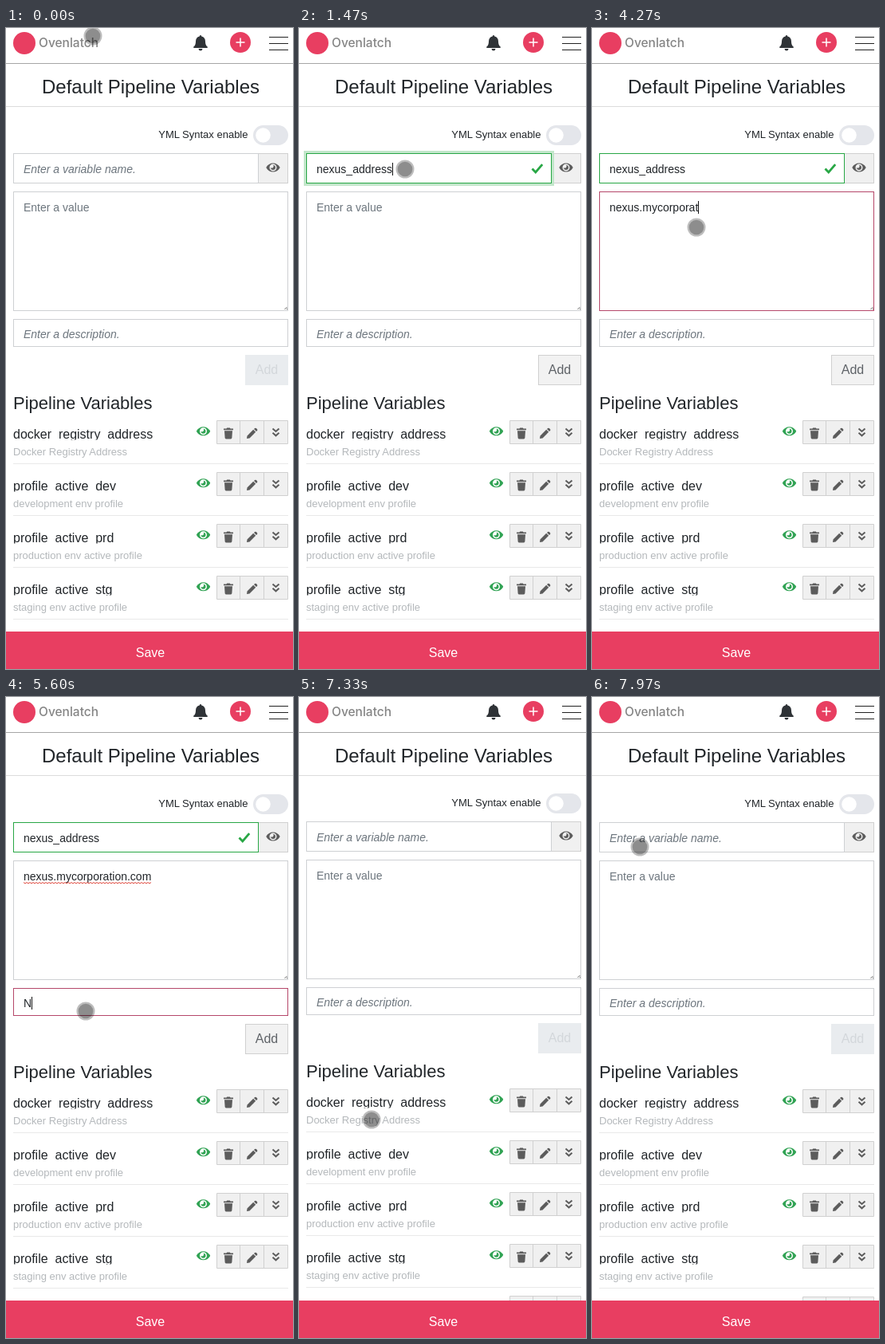
Write an HTML page that moves like this. It is 360 px wide and 804 px high and loops after 8000 ms.

```html
<!DOCTYPE html>
<html lang="en">
<head>
<meta charset="utf-8">
<title>Default Pipeline Variables</title>
<style>
  html, body { margin: 0; width: 100%; height: 100%; overflow: hidden; background: #fff; }
  svg { display: block; width: 360px; height: 804px; font-family: "Liberation Sans", Arial, sans-serif; }
  text { fill: #212529; white-space: pre; }
  .field { font-size: 14px; }
  .hint { font-size: 14px; fill: #6c757d; }
  .italic { font-style: italic; }
  .note { font-size: 13px; fill: #b4b8bb; }
  .box { fill: #fff; stroke: #ced0d3; }
  .btn { fill: #f0f0f0; stroke: #d0d0d0; }
  .icon { fill: #5c5c5c; }
</style>
</head>
<body>
<svg viewBox="0 0 360 804">
  <defs>
    <clipPath id="pageClip"><rect y="99" width="360" height="658"/></clipPath>
    <clipPath id="nameClip"><rect width="230" height="24.5"/></clipPath>
    <g id="eye">
      <path fill-rule="evenodd" d="M-8.7 0C-5-7.4 5-7.4 8.7 0C5 7.4-5 7.4-8.7 0ZM-4.5 0A4.5 4.5 0 1 0 4.5 0A4.5 4.5 0 1 0-4.5 0Z"/>
      <path d="M-3 0A3 3 0 1 0 0-3A1.7 1.7 0 0 1-3 0Z"/>
    </g>
    <g id="trash">
      <path d="M-6-6H-2.5L-1.8-7H1.8L2.5-6H6V-4.3H-6ZM-5-3.3H5L4.4 5.6Q4.3 7 3 7H-3Q-4.3 7-4.4 5.6Z"/>
    </g>
    <g id="pen">
      <path d="M-6.5 6.5L-6 3L1.7-4.7L4.7-1.7L-3 6ZM2.5-5.5L3.6-6.6Q4.5-7.2 5.4-6.4L6.4-5.4Q7.2-4.5 6.6-3.6L5.5-2.5Z"/>
    </g>
    <path id="chevrons" d="M-4-4.5L0-1L4-4.5M-4 .8L0 4.3L4 .8" fill="none" stroke="#5c5c5c" stroke-width="2"/>
  </defs>

  <rect width="360" height="804" fill="#fff"/>

  <g clip-path="url(#pageClip)">
    <g id="page">
      <text x="303.5" y="138" font-size="13" text-anchor="end">YML Syntax enable</text>
      <rect x="310" y="122" width="44" height="25" rx="12.5" fill="#e4e6eb"/>
      <circle cx="322.5" cy="134.5" r="9.3" fill="#fff"/>

      <rect class="btn" x="316.5" y="157.5" width="37" height="37"/>
      <use href="#eye" x="335" y="175" class="icon"/>
      <rect id="glow" x="7.5" y="155.5" width="311" height="41" fill="none" stroke="#c3e6cb" stroke-width="3"/>
      <rect id="nameBox" class="box" x="9.5" y="157.5" width="307" height="37"/>
      <path id="check" d="M292.5 176.5L296.8 181L305.2 171.2" fill="none" stroke="#28a745" stroke-width="2.8"/>
      <text id="nameHint" class="hint italic" x="22" y="182">Enter a variable name.</text>
      <text id="nameText" class="field" x="22" y="182"></text>

      <rect id="valueBox" class="box" x="9.5" y="205.5" width="344" height="149"/>
      <path d="M349.5 353L352.5 350M352 353L353 352" stroke="#666" stroke-width="1"/>
      <text id="valueHint" class="hint" x="22" y="230">Enter a value</text>
      <text id="valueText" class="field" x="22" y="230"></text>
      <path id="squiggle" fill="none" stroke="#e0453a" stroke-width="1"/>

      <rect id="descBox" class="box" x="9.5" y="365.5" width="344" height="34"/>
      <text id="descHint" class="hint italic" x="22" y="389">Enter a description.</text>
      <text id="descText" class="field" x="22" y="389"></text>

      <rect id="caret" width="1" height="16" fill="#111"/>

      <rect id="addBox" x="300.5" y="410.5" width="53" height="37"/>
      <text id="addText" x="327" y="434" font-size="16" text-anchor="middle">Add</text>

      <text x="9" y="478" font-size="22">Pipeline Variables</text>
      <g id="rows"></g>
    </g>
  </g>

  <path d="M0 44.5H360" stroke="#a6a6a6"/>
  <path d="M0 98.5H360" stroke="#dcdcdc"/>
  <circle cx="23" cy="19" r="14" fill="#e83e61"/>
  <text x="41" y="23.5" style="font:500 15.5px Inter,sans-serif;fill:#858585">Ovenlatch</text>
  <path d="M244 9Q245.3 9 245.3 10.6Q250 11.8 250 17Q250 21.5 252.7 23.6V25H235.3V23.6Q238 21.5 238 17Q238 11.8 242.7 10.6Q242.7 9 244 9ZM241.5 26H246.5Q246.2 28.6 244 28.6Q241.8 28.6 241.5 26Z" fill="#2f3337"/>
  <circle cx="294" cy="18" r="13" fill="#e83e61"/>
  <path d="M288.5 18H299.5M294 12.5V23.5" stroke="#fff" stroke-width="1.5"/>
  <path d="M330 11.5H354M330 19.5H354M330 27.5H354" stroke="#222"/>
  <text x="45" y="82" font-size="24">Default Pipeline Variables</text>

  <rect y="757" width="360" height="47" fill="#e83e61"/>
  <text x="181" y="789" font-size="16" text-anchor="middle" style="fill:#fff">Save</text>

  <g id="pointer">
    <circle r="11.5" fill="#000" fill-opacity=".26"/>
    <circle r="9.3" fill="#000" fill-opacity=".25"/>
  </g>
</svg>

<script>
const LOOP = 8000;
const ADDED = 6800;
const el = id => document.getElementById(id);
const show = (id, on) => el(id).setAttribute('visibility', on ? 'visible' : 'hidden');
const set = (id, attrs) => {
  for (const key in attrs) el(id).setAttribute(key, attrs[key]);
};

const fields = [
  { id: 'name', text: 'nexus_address', focus: 440, blur: 2090, start: 530, step: 72, y: 169 },
  { id: 'value', text: 'nexus.mycorporation.com', focus: 2090, blur: 5240, start: 2760, step: 95, y: 217 },
  { id: 'desc', text: 'Nexus Address', focus: 5240, blur: ADDED - 30, start: 5560, step: 75, y: 376 }
];

const pointerPath = [
  [30, 109, 10], [420, 133, 177], [1700, 133, 177], [2050, 131, 250],
  [4900, 131, 250], [5200, 100, 394], [6510, 100, 394], [6720, 327, 429],
  [6860, 327, 429], [7220, 91, 530], [7640, 91, 530], [7960, 60, 188]
];
const scrollPath = [[7290, 0], [7530, 64], [7600, 64], [7840, 0]];

const variables = [
  ['docker_registry_address', 'Docker Registry Address'],
  ['profile_active_dev', 'development env profile'],
  ['profile_active_prd', 'production env active profile'],
  ['profile_active_stg', 'staging env active profile'],
  ['nexus_address', 'Nexus Address']
];

el('rows').innerHTML = variables.map(([name, note], i) => `
  <g id="row${i}" transform="translate(0 ${492 + 65 * i})">
    <text x="9" y="23" font-size="16" clip-path="url(#nameClip)">${name}</text>
    <text class="note" x="9" y="44">${note}</text>
    <path d="M9 54.5H354" stroke="#e9e9e9"/>
    <use href="#eye" x="247.5" y="13.8" fill="#31a354"/>
    <path class="btn" d="M264.5 .5H353.5V29.5H264.5ZM293.5 .5V29.5M323.5 .5V29.5"/>
    <g class="icon">
      <use href="#trash" x="279" y="16.5"/>
      <use href="#pen" x="308.5" y="16.5"/>
      <use href="#chevrons" x="338.5" y="15"/>
    </g>
  </g>`).join('');

let wave = 'M22 232.5';
for (let x = 24; x <= 182; x += 2) wave += `L${x} ${x % 4 ? 232.5 : 234}`;
set('squiggle', { d: wave });

const ease = u => u < .5 ? 4 * u ** 3 : 1 - 4 * (1 - u) ** 3;

// Eased position on a list of [time, ...values]
function follow(path, t) {
  if (t <= path[0][0]) return path[0].slice(1);
  const i = path.findIndex(p => p[0] > t);
  if (i < 0) return path[path.length - 1].slice(1);
  const a = path[i - 1], b = path[i];
  const u = ease((t - a[0]) / (b[0] - a[0]));
  return a.slice(1).map((v, k) => v + (b[k + 1] - v) * u);
}

function typedCount(f, t) {
  if (t >= ADDED || t < f.start) return 0;
  return Math.min(f.text.length, Math.floor((t - f.start) / f.step) + 1);
}

function drawField(f, t) {
  const count = typedCount(f, t);
  const focused = t >= f.focus && t < f.blur;
  const valid = f.id === 'name' && count > 0;
  el(f.id + 'Text').textContent = f.text.slice(0, count);
  show(f.id + 'Hint', !count);
  el(f.id + 'Box').style.stroke = valid ? '#28a745' : focused ? '#b5476a' : '';
  if (f.id === 'name') {
    show('check', valid);
    show('glow', valid && focused);
  }
  if (!focused) return;
  const lastKey = count ? f.start + (count - 1) * f.step : f.focus;
  const width = count ? el(f.id + 'Text').getComputedTextLength() : 0;
  set('caret', { x: Math.round(22 + width), y: f.y });
  show('caret', (t - lastKey) % 1000 < 500);
}

function draw(t) {
  show('caret', false);
  fields.forEach(f => drawField(f, t));
  show('squiggle', t >= fields[1].blur && t < ADDED);

  const enabled = typedCount(fields[0], t) > 0;
  set('addBox', { fill: enabled ? '#f2f2f2' : '#e9ecef', stroke: enabled ? '#d0d0d0' : '#e9ecef' });
  el('addText').style.fill = enabled ? '#5f6368' : '#d3d7db';
  show('row4', t >= ADDED);

  const [scroll] = follow(scrollPath, t);
  set('page', { transform: `translate(0 ${-Math.round(scroll)})` });
  const [x, y] = follow(pointerPath, t);
  set('pointer', { transform: `translate(${x} ${y})` });
}

const begin = performance.now();
function tick() {
  draw((performance.now() - begin) % LOOP);
  requestAnimationFrame(tick);
}
tick();
</script>
</body>
</html>
```
